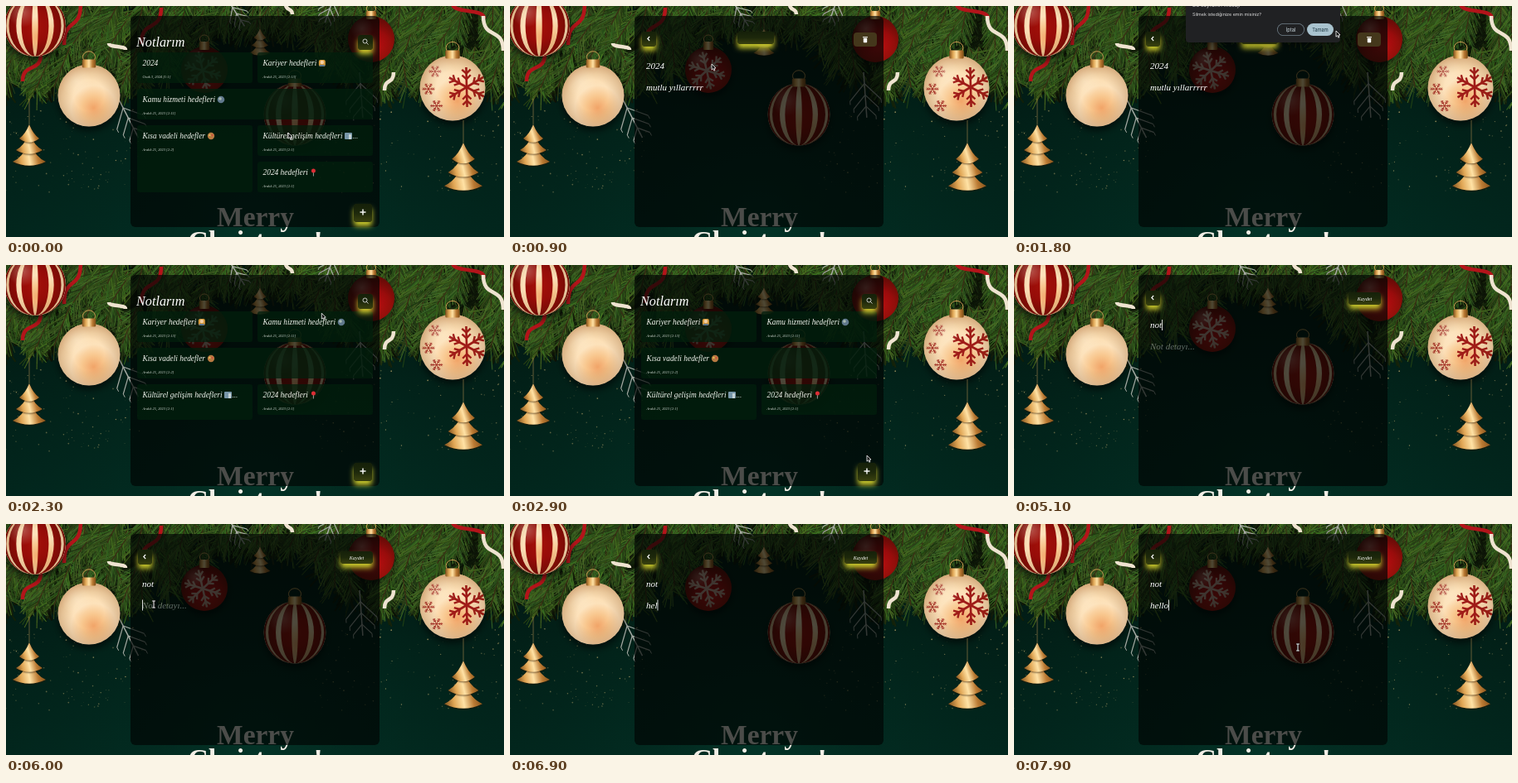
Animation, 600 px wide and 279 px high, one loop 8 s. Source, as an HTML page with a canvas:

```html
<!DOCTYPE html>
<html lang="tr">
<head>
<meta charset="utf-8">
<style>
html, body { margin: 0; width: 100%; height: 100%; overflow: hidden; background: #02261d; }
canvas { display: block; width: 600px; height: 279px; }
</style>
</head>
<body>
<canvas id="stage" width="600" height="279"></canvas>
<script>
const W = 600, H = 279, LOOP = 8000, TAU = Math.PI * 2;
const SERIF = '"Liberation Serif", "Noto Serif", serif';
const SANS = 'Inter, Roboto, sans-serif';
const stage = document.getElementById('stage').getContext('2d');
const backdrop = document.createElement('canvas');
backdrop.width = W;
backdrop.height = H;
let c = backdrop.getContext('2d');

let seed = 11;
const rnd = (a = 0, b = 1) => {
  seed = (seed * 16807) % 2147483647;
  return a + (b - a) * seed / 2147483647;
};
const clamp = v => Math.min(1, Math.max(0, v));

function disc(x, y, r, fill) {
  c.fillStyle = fill;
  c.beginPath();
  c.arc(x, y, r, 0, TAU);
  c.fill();
}

function box(x, y, w, h, r, fill) {
  c.fillStyle = fill;
  c.beginPath();
  c.roundRect(x, y, w, h, r);
  c.fill();
}

function line(color, width, ...pts) {
  c.strokeStyle = color;
  c.lineWidth = width;
  c.beginPath();
  for (let i = 0; i < pts.length; i += 2) c.lineTo(pts[i], pts[i + 1]);
  c.stroke();
}

// Line of length l from a point in direction a; returns its far end.
function ray(color, width, x, y, a, l) {
  const end = [x + Math.cos(a) * l, y + Math.sin(a) * l];
  line(color, width, x, y, ...end);
  return end;
}

function withShadow(color, blur, dy, draw) {
  c.save();
  c.shadowColor = color;
  c.shadowBlur = blur;
  c.shadowOffsetY = dy;
  draw();
  c.restore();
}

function shade(gradient, stops) {
  stops.forEach((s, i) => gradient.addColorStop(i / (stops.length - 1), s));
  return gradient;
}
const radial = (x, y, r, ...stops) => shade(c.createRadialGradient(x, y, 0, x, y, r), stops);
const linear = (x0, y0, x1, y1, ...stops) => shade(c.createLinearGradient(x0, y0, x1, y1), stops);

function text(s, x, y, font, fill, align = 'left') {
  c.font = font;
  c.fillStyle = fill;
  c.textAlign = align;
  c.fillText(s, x, y);
  return c.measureText(s).width;
}

// ---- Backdrop ----

// A sprig of needles; depth 0 is the shadowed layer, 1 the lit one.
function sprig(x0, y0, a, len, depth) {
  for (let d = 0; d < len; d += 2) {
    const x = x0 + Math.cos(a) * d, y = y0 + Math.sin(a) * d;
    for (const side of [-1, 1]) {
      const light = depth ? rnd(13, 30) : rnd(4, 11);
      ray(`hsl(${rnd(84, 106)} ${rnd(42, 58)}% ${light}%)`, depth ? 1.1 : 2.2,
        x, y, a + side * rnd(0.3, 0.8), rnd(15, 29));
    }
  }
  if (depth) ray('#3a2d14', 1.3, x0, y0, a, len);
}

// Sprigs hang from the top edge, deep at the sides and shallow in the middle.
function pine() {
  for (const depth of [0, 1]) {
    for (let x = -15; x <= 615; x += 14) {
      const drop = 28 + 82 * clamp((Math.abs(x - 300) - 55) / 80);
      for (const y of [drop * 0.45, drop * 0.05, -20]) {
        sprig(x + rnd(-9, 9), y, Math.PI / 2 + rnd(-0.65, 0.65), drop * 0.42 + rnd(0, 8), depth);
      }
    }
  }
}

function twig(x, y, a, len) {
  ray('#a9ada6', 1.5, x, y, a, len);
  for (let d = 0.25; d < 0.9; d += 0.25) {
    for (const s of [-1, 1]) {
      const [px, py] = ray('#a9ada6', 1.2, x + Math.cos(a) * len * d, y + Math.sin(a) * len * d,
        a + s * 0.75, len * (0.6 - d * 0.4));
      ray('#a9ada6', 1, px, py, a, len * 0.08);
    }
  }
}

function flake(x, y, r, color, turn = 0) {
  for (let a = turn; a < turn + TAU - 0.1; a += TAU / 6) {
    ray(color, r * 0.11, x, y, a, r);
    for (const d of [0.4, 0.68]) for (const s of [-1, 1]) {
      ray(color, r * 0.1, x + Math.cos(a) * r * d, y + Math.sin(a) * r * d, a + s * 0.8, r * 0.3);
    }
  }
}

const GOLD = ['#80501c', '#e0a655', '#ffe2a5', '#bb7b34', '#7d4b16'];
const CREAM = ['#f1a468', '#f8c68d', '#fde2bb', '#fbdcae', '#f2c693'];
const RED = ['#b81010', '#9c0b0c', '#5a0507'];

function bauble(x, y, r, colors, decorate) {
  c.strokeStyle = '#c79a52';
  c.lineWidth = 1;
  c.beginPath();
  c.ellipse(x, y - r - 9, r * 0.2, r * 0.18, 0, 0, TAU);
  c.stroke();
  withShadow('rgba(0,0,0,.6)', 9, 5, () => disc(x, y, r, radial(x + r * 0.15, y + r * 0.4, r * 1.45, ...colors)));
  c.save();
  c.beginPath();
  c.arc(x, y, r, 0, TAU);
  c.clip();
  if (decorate) decorate();
  disc(x, y, r, radial(x, y, r, 'rgba(90,35,0,0)', 'rgba(90,35,0,0)', 'rgba(90,35,0,.2)'));
  disc(x - r * 0.4, y - r * 0.45, r * 0.5, radial(x - r * 0.4, y - r * 0.45, r * 0.5, 'rgba(255,245,225,.3)', 'rgba(255,245,225,0)'));
  c.restore();
  box(x - r * 0.22, y - r - 6, r * 0.44, 10, 1.5, linear(x - r * 0.22, 0, x + r * 0.22, 0, ...GOLD));
}

function striped(x, y, r) {
  const half = Math.PI / 2;
  const meridian = (a, from) => c.ellipse(x, y, r * Math.abs(Math.sin(a)), r, 0, from, -from, (a > 0) === (from > 0));
  bauble(x, y, r, CREAM, () => {
    c.fillStyle = radial(x, y, r, '#a31009', '#960c08', '#780706');
    for (let a = -1.4; a < 1.5; a += 0.56) {
      c.beginPath();
      meridian(a - 0.18, -half);
      meridian(a + 0.18, half);
      c.fill();
    }
  });
}

function goldTree(x, top, w, h, hang) {
  line('#a9884e', 0.6, x, hang, x, top);
  for (let i = 2; i >= 0; i--) {
    const half = w * (0.3 + 0.1 * i), y0 = top + h * 0.22 * i, y1 = top + h * (0.34 + 0.28 * i);
    c.fillStyle = linear(x - half, y1, x + half, y1 - h * 0.15, ...GOLD);
    c.beginPath();
    c.moveTo(x, y0);
    c.quadraticCurveTo(x + half * 0.4, y1 - h * 0.1, x + half, y1);
    c.quadraticCurveTo(x, y1 + h * 0.19, x - half, y1);
    c.quadraticCurveTo(x - half * 0.4, y1 - h * 0.1, x, y0);
    withShadow('rgba(40,20,0,.6)', 2, 1, () => c.fill());
  }
}

function ribbon(color, x, y, dx, dy) {
  c.strokeStyle = color;
  c.lineWidth = 4.5;
  c.beginPath();
  c.moveTo(x, y);
  c.bezierCurveTo(x, y + dy * 0.7, x + dx, y + dy * 0.3, x + dx, y + dy);
  c.stroke();
}

function paintBackdrop() {
  c.fillStyle = linear(0, 0, 0, H, '#021712', '#02231a', '#022a20');
  c.fillRect(0, 0, W, H);
  c.fillStyle = radial(300, 270, 330, 'rgba(5,66,50,.4)', 'rgba(3,40,30,.15)', 'rgba(0,0,0,.1)');
  c.fillRect(0, 0, W, H);
  pine();

  for (let i = 0; i < 240; i++) {
    disc(i % 2 ? rnd(0, 165) : rnd(370, 600), rnd(125, 225), rnd(0.3, 0.9), `rgba(190,170,110,${rnd(0.15, 0.75)})`);
  }
  twig(135, 111, 1.1, 54);
  twig(426, 80, 1.5, 55);
  twig(268, -6, 1, 36);
  twig(396, -14, 1.9, 36);

  const red = '#b3141a', ivory = '#efe3d0';
  ribbon(red, 90, -3, -20, 50);
  ribbon(red, 42, 58, -22, 33);
  ribbon(red, 187, 2, -24, 44);
  ribbon(ivory, 144, 53, -20, -8);
  ribbon(ivory, 337, -2, 8, 12);
  ribbon(red, 538, -3, 38, 18);
  ribbon(ivory, 575, 12, 24, 42);
  ribbon(ivory, 467, 80, -11, 22);

  goldTree(306, 27, 25, 33, 0);
  bauble(239, 77, 28, RED, () => flake(237, 78, 23, '#c9a394', 0.3));
  bauble(440, 40, 28, RED);
  striped(348, 131, 37.5);
  striped(35, 24, 37);
  bauble(100, 108, 37.5, CREAM);
  bauble(538, 99, 39.5, CREAM, () => {
    flake(555, 98, 24, '#a01c18', 0.5);
    for (let a = 2.3; a < 4; a += 0.8) flake(538 + 29 * Math.cos(a), 99 + 29 * Math.sin(a), 7.5, '#a01c18');
  });
  goldTree(28, 143, 40, 50, 112);
  goldTree(551, 165, 46, 58, 138);

  text('Merry', 300.5, 266, `bold 33.5px ${SERIF}`, '#f2eee6', 'center');
  text('Christmas!', 300.5, 294.5, `bold 34px ${SERIF}`, '#f2eee6', 'center');
  box(150, 12, 300, 255, 6, 'rgba(0,5,3,.69)');
}

// ---- Note app ----

const script = size => `italic ${size}px ${SERIF}`;

function glowButton(x, y, w, h) {
  withShadow('#c9c82c', 6, 5, () => box(x, y, w, h, 4, '#202b0c'));
  box(x, y, w, h, 4, linear(0, y, 0, y + h, '#152009', '#1d280b', '#3b420f'));
}

const icons = {
  person(x, y) {
    box(x, y - 7, 8, 8, 2, '#d99a3a');
    disc(x + 4, y - 4, 2.2, '#f2cfa5');
    box(x + 1, y - 1, 6, 2, 0, '#5d7790');
  },
  globe(x, y) {
    disc(x + 4.5, y - 3, 4.3, '#60788c');
    disc(x + 3.5, y - 4, 1.8, '#a9bab0');
  },
  palette(x, y) {
    disc(x + 4.5, y - 3, 4.2, '#b87a42');
    disc(x + 3, y - 4, 1, '#e8d35a');
    disc(x + 6, y - 4, 1, '#d84a3e');
  },
  city(x, y) {
    box(x, y - 7, 9, 8, 1, '#7896a8');
    box(x + 5, y - 5, 3, 6, 0, '#c3d0d2');
    text('...', x + 9.5, y, script(9), '#eee');
  },
  pin(x, y) {
    line('#b9b9b9', 0.8, x + 4, y - 4, x + 4, y + 1.5);
    disc(x + 4, y - 5, 2.5, '#dc2d35');
  }
};

const notes = [
  ['2024', 'Ocak 3, 2024 [1:1]'],
  ['Kariyer hedefleri', 'Aralık 25, 2023 [2:13]', 'person'],
  ['Kamu hizmeti hedefleri', 'Aralık 25, 2023 [2:11]', 'globe'],
  ['Kısa vadeli hedefler', 'Aralık 25, 2023 [2:2]', 'palette'],
  ['Kültürel gelişim hedefleri', 'Aralık 25, 2023 [2:1]', 'city'],
  ['2024 hedefleri', 'Aralık 25, 2023 [2:1]', 'pin']
];

function card([title, date, icon], x, y, w, h) {
  box(x, y, w, h, 3, 'rgba(2,31,12,.76)');
  const width = text(title, x + 6.5, y + 16, script(9.4), '#f4f4ee');
  if (icon) icons[icon](x + 9 + width, y + 16);
  text(date, x + 6.5, y + 30.5, script(4.4), '#d6dbd4');
}

// Staggered grid: the third note is wide, the fourth may span two rows.
function list(items) {
  items.forEach((note, i) => {
    const right = i === 1 || i > 3, tall = items.length > 5 ? 81 : 43;
    card(note, right ? 303 : 158, 56 + 44 * Math.floor(i * 2 / 3), i === 2 ? 284 : 139, i === 3 ? tall : 37);
  });
  text('Notlarım', 157, 49, script(16.2), '#fff');
  glowButton(424, 35, 18, 18);
  c.strokeStyle = '#ddd';
  c.lineWidth = 0.9;
  c.beginPath();
  c.arc(432.5, 42.5, 2.5, 0, TAU);
  c.stroke();
  line('#ddd', 0.9, 434.4, 44.4, 436.5, 46.5);
  glowButton(419, 239, 22, 22);
  line('#fff', 1.4, 426.5, 249, 433.5, 249);
  line('#fff', 1.4, 430, 245.5, 430, 252.5);
}

function backButton() {
  glowButton(159, 31, 17, 18);
  line('#fff', 1.1, 168.2, 37, 165.8, 39.5, 168.2, 42);
}

function field(value, hint, y, focused) {
  const width = text(value || hint, 164, y, script(11), value ? '#fff' : 'rgba(205,212,205,.48)');
  const caret = 164.5 + (value ? width : 0);
  if (focused) line('#f2f2f2', 0.9, caret, y - 10, caret, y + 3);
}

function dialog() {
  withShadow('rgba(0,0,0,.6)', 8, 0, () => box(207, -8, 186, 52, 4, '#202123'));
  text('Bu sayfanın mesajı', 215, 0.6, `6.5px ${SANS}`, '#ddd');
  text('Silmek istediğinize emin misiniz?', 215, 12.4, `5.4px ${SANS}`, '#dedede');
  box(317, 21, 33, 15, 7.5, '#71808a');
  box(317.8, 21.8, 31.4, 13.4, 6.7, '#202123');
  text('İptal', 333.5, 30.6, `5.6px ${SANS}`, '#d3e1e8', 'center');
  box(353, 21, 32, 15, 7.5, '#a9c3cf');
  text('Tamam', 369, 30.6, `5.6px ${SANS}`, '#17323d', 'center');
}

function detail(asking) {
  backButton();
  glowButton(274, 31, 44, 15);
  box(414, 32, 28, 17, 4, '#44371b');
  box(425.8, 38.8, 4.4, 5.4, 0.7, '#fff');
  box(425, 37.2, 6, 1, 0, '#fff');
  field('2024', '', 76);
  field('mutlu yıllarrrrr', '', 102);
  if (asking) dialog();
}

const typed = (word, start, t) => word.slice(0, Math.max(0, Math.floor((t - start) / 200) + 1));

function editor(t) {
  const inBody = t >= 5900;
  backButton();
  glowButton(403, 33, 39, 15);
  text('Kaydet', 422.5, 43, script(6.2), '#fff', 'center');
  field(typed('not', 4500, t), 'Başlık', 76, !inBody);
  field(typed('hello', 6400, t), 'Not detayı...', 101.5, inBody);
}

// ---- Pointer ----

// Each stop: arrival time and place; the pointer eases from one to the next.
const stops = [
  [0, 340, 156], [800, 225, 76], [1350, 428, 42], [1800, 388, 33], [2100, 371, 29], [2900, 430, 233],
  [3200, 430, 249], [3700, 369, 133], [4300, 188, 73], [5400, 188, 73], [5900, 178, 97], [7300, 178, 97],
  [7900, 342, 149], [LOOP, 345, 146]
];

function pointerAt(t) {
  const i = stops.findIndex(s => s[0] > t), [t0, x0, y0] = stops[i - 1], [t1, x1, y1] = stops[i];
  const k = (t - t0) / (t1 - t0), e = k * k * (3 - 2 * k);
  return [x0 + (x1 - x0) * e, y0 + (y1 - y0) * e];
}

function beam(x, y) {
  for (const [color, width] of [['#111', 2.4], ['#f5f5f5', 1]]) {
    line(color, width, x, y - 4, x, y + 4);
    for (const end of [y - 4, y + 4]) line(color, width, x - 1.8, end, x + 1.8, end);
  }
}

function arrow(x, y) {
  c.fillStyle = '#111';
  c.strokeStyle = '#fff';
  c.lineWidth = 0.8;
  const shape = new Path2D(`M${x} ${y - 3}v7.2l1.7-1.5 1.1 2.5 1.2-.6-1.1-2.4 2.1-.2z`);
  c.fill(shape);
  c.stroke(shape);
}

function pointer(t) {
  const typing = (t >= 4400 && t < 5400) || (t >= 6200 && t < 7300);
  if (typing) return;
  (t < 3500 ? arrow : beam)(...pointerAt(t));
}

function frame(now) {
  const t = now % LOOP;
  c.drawImage(backdrop, 0, 0);
  if (t < 900) list(notes);
  else if (t < 2150) detail(t >= 1500);
  else if (t < 3200) list(notes.slice(1));
  else editor(t);
  pointer(t);
  requestAnimationFrame(frame);
}

paintBackdrop();
c = stage;
frame(0);
</script>
</body>
</html>
```
